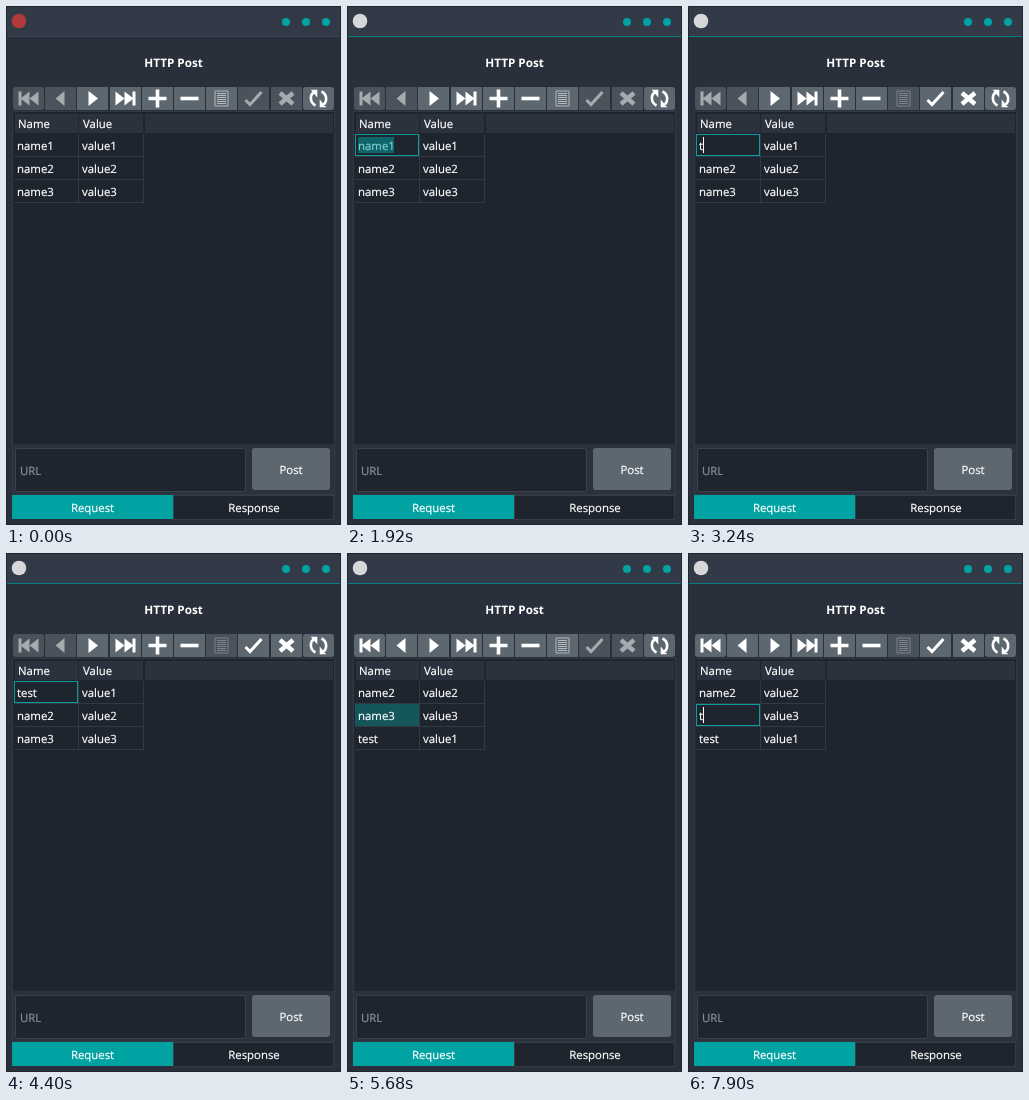
Write an HTML page that moves like this. It is 335 by 519 pixels and loops after 8 s.

```html
<!DOCTYPE html>
<html lang="en">
<head>
<meta charset="utf-8">
<title>HTTP Post</title>
<style>
  html, body { margin: 0; width: 100%; height: 100%; overflow: hidden; background: #2a303b; }
  svg { display: block; width: 335px; height: 519px; }
  text { font: 11.4px "Open Sans", "Noto Sans", sans-serif; fill: #fff; stroke: #fff; stroke-width: .2; text-rendering: geometricPrecision; white-space: pre; }
  .title { font-size: 11.7px; font-weight: 700; stroke: none; }
  .mid { text-anchor: middle; }
  .hint { fill: #8a9097; stroke: #8a9097; }
  .dark { fill: #1f252e; }
  .panel { fill: #2b323d; }
  .line { fill: none; stroke: #323944; }
  .teal { fill: #00a2a2; }
  .button { --ink: #fff; fill: #5d6770; }
  .button.off { --ink: #a6abaf; fill: #4a525b; }
  .button.list { --ink: #b4babd; }
  .button.list.off { --ink: #7d838a; }
  .solid { fill: var(--ink); }
  .stroke { fill: none; stroke: var(--ink); }
</style>
</head>
<body>
<svg id="stage" viewBox="0 0 335 519">
  <rect width="335" height="519" fill="#2a303b"/>
  <rect width="335" height="30" fill="#323a47"/>
  <rect x=".5" y=".5" width="334" height="518" fill="none" stroke="#20262f"/>
  <rect id="accent" x="1" y="30" width="333" height="1"/>
  <circle id="logo" cx="13" cy="15" r="7.3"/>
  <g class="teal">
    <circle cx="280" cy="16" r="4"/><circle cx="300" cy="16" r="4"/><circle cx="320" cy="16" r="4"/>
  </g>
  <text class="title mid" x="167.5" y="61">HTTP Post</text>

  <g id="toolbar"></g>

  <rect class="dark" x="7" y="106" width="321" height="332"/>
  <rect class="line" x="6.5" y="105.5" width="322" height="383"/>
  <g class="panel">
    <rect x="9" y="108" width="63" height="19"/>
    <rect x="73" y="108" width="64" height="19"/>
    <rect x="139" y="108" width="188" height="19"/>
  </g>
  <path class="line" d="M8 150.5H138M8 173.5H138M8 196.5H138M72.5 128V197M137.5 128V197"/>
  <text x="12" y="122">Name</text>
  <text x="77" y="122">Value</text>
  <rect id="cell" x="8" width="64" height="22" fill="#13575b"/>
  <g id="rows"></g>
  <rect id="editor" x="8.5" width="63" height="21" fill="none" stroke="#0d9c9d"/>
  <rect id="selection" x="11" width="36" height="16" fill="#00a2a2" opacity=".52"/>
  <rect id="caret" width="1" height="16" fill="#fff"/>

  <rect class="panel" x="7" y="438" width="321" height="50"/>
  <rect class="dark" x="9.5" y="442.5" width="230" height="43" rx="2" stroke="#3b424d"/>
  <text class="hint" x="14" y="469">URL</text>
  <rect x="246" y="442" width="78" height="42" rx="3" fill="#5d6770"/>
  <text class="mid" x="285" y="468">Post</text>
  <rect class="teal" x="6" y="489" width="161" height="24"/>
  <rect class="dark" x="167.5" y="489.5" width="160" height="24" stroke="#353c47"/>
  <text class="mid" x="86.5" y="506">Request</text>
  <text class="mid" x="248" y="506">Response</text>
</svg>

<script>
const LOOP = 8000;
const $ = id => document.getElementById(id);

function add(parent, tag, attrs) {
  const node = document.createElementNS("http://www.w3.org/2000/svg", tag);
  for (const key in attrs) node.setAttribute(key, attrs[key]);
  return parent.appendChild(node);
}

// Icons are centred on the origin; [name, path, stroke width or 0 for solid].
const icons = [
  ["first", "M-10-7h3v14h-3zM-8 0L1-7V7zM1 0L10-7V7z", 0],
  ["prev", "M-5 0L4-7.5v15z", 0],
  ["next", "M5.5 0L-4-7.5v15z", 0],
  ["last", "M10-7h-3v14h3zM8 0L-1-7V7zM-1 0L-10-7V7z", 0],
  ["plus", "M-9 0h18M0-9v18", 3.6],
  ["minus", "M-9 0h18", 3.6],
  ["list", "M-6.5-7.5h13v15h-13zM-4.5-5h9M-4.5-3h9M-4.5-1h9M-4.5 1h9M-4.5 3h9M-4.5 5h9", 1],
  ["check", "M-8 1.5L-3.5 6L8-6.5", 3],
  ["cross", "M-6.5-5.5L6.5 5.5M6.5-5.5L-6.5 5.5", 4.5],
  ["refresh", "M-3 7C-9 4-9-4-4-6.5M3-7C9-4 9 4 4 6.5M-5-7.5h2.5v3zM5 7.5h-2.5v-3z", 2.6]
];
const buttons = {};
icons.forEach(([name, d, width], i) => {
  const x = Math.round(7 + i * 32.2);
  const group = add($("toolbar"), "g", { class: "button " + name });
  add(group, "rect", { x, y: 81, width: 31, height: 23, rx: i % 9 ? 0 : 3 });
  add(group, "path", {
    d, class: width ? "stroke" : "solid", "stroke-width": width,
    transform: `translate(${x + 15.5} 92.5)`
  });
  buttons[name] = group;
});

const rowTop = row => 128 + 23 * row;
const rows = [0, 1, 2].map(row => [11, 76].map(x =>
  add($("rows"), "text", { x, y: rowTop(row) + 16 })));

const atTop = ["first", "prev"];
const idle = ["check", "cross"];
const before = ["name1 value1", "name2 value2", "name3 value3"];
const after = ["name2 value2", "name3 value3", "test value1"];

// Each step overrides parts of the state that went before it.
const steps = [
  [0, { active: false, row: 0, mode: "none", caret: 0, data: before, typed: "", off: [...atTop, ...idle] }],
  [1040, { active: true, mode: "cell" }],
  [1920, { mode: "select" }],
  [2060, { caret: 47 }],
  [2160, { caret: 0 }],
  [3240, { mode: "type", typed: "t", caret: 15, off: [...atTop, "list"] }],
  [3380, { typed: "te", caret: 21 }],
  [3650, { typed: "tes", caret: 26 }],
  [3890, { typed: "test", caret: 30 }],
  [4400, { caret: 0 }],
  [4870, { caret: 30 }],
  [5380, { caret: 0 }],
  [5680, { row: 1, mode: "cell", data: after, off: idle }],
  [5850, { mode: "select" }],
  [7900, { mode: "type", typed: "t", caret: 15, off: ["list"] }]
];

function show(id, visible, y) {
  $(id).setAttribute("visibility", visible ? "visible" : "hidden");
  $(id).setAttribute("y", y);
}

function render(time) {
  const state = Object.assign({}, ...steps.filter(([at]) => at <= time).map(([, change]) => change));
  const { active, row, mode, caret, data, typed, off } = state;
  const top = rowTop(row);

  $("accent").setAttribute("fill", active ? "#087d80" : "#3a424d");
  $("logo").setAttribute("fill", active ? "#d5d7d9" : "#b33a3a");
  for (const name in buttons) buttons[name].classList.toggle("off", off.includes(name));

  rows.forEach((cells, i) => {
    const values = data[i].split(" ");
    if (mode === "type" && i === row) values[0] = typed;
    cells.forEach((cell, j) => { cell.textContent = values[j]; });
  });

  show("cell", mode === "cell", top);
  show("editor", mode === "select" || mode === "type", top + 0.5);
  show("selection", mode === "select", top + 3);
  show("caret", caret > 0, top + 3);
  $("caret").setAttribute("x", caret);
}

const start = performance.now();
function tick() {
  render((performance.now() - start) % LOOP);
  requestAnimationFrame(tick);
}
tick();
</script>
</body>
</html>
```
